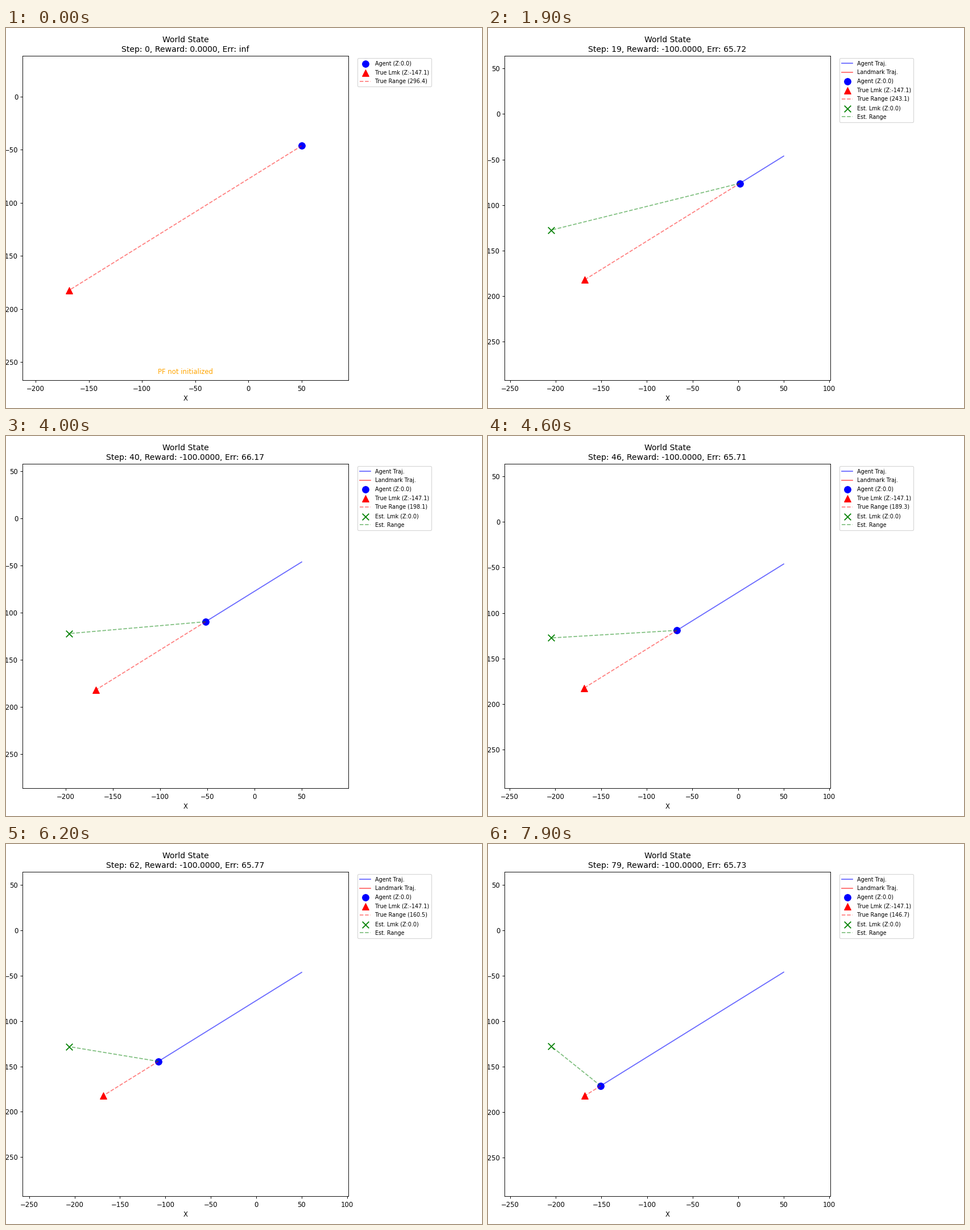
A matplotlib script that plays this animation: 837 by 669 pixels, repeating every 8000 ms.

```python
import numpy as np
import matplotlib.pyplot as plt
from matplotlib.animation import FuncAnimation
from matplotlib.ticker import MultipleLocator

W, H, DPI = 837, 669, 83.7
LEFT, TOP, RIGHT, BOTTOM = 29.4, 48.6, 601.7, 620.4  # plot box in pixels
STEPS, INTERVAL = 80, 100

# World geometry: the agent heads straight for the landmark
START = np.array([50.0, -46.2])
LANDMARK = np.array([-168.4, -182.2])
DEPTH = 147.1
AHEAD = (START - LANDMARK) / np.linalg.norm(START - LANDMARK)
SIDE = np.array([-AHEAD[1], AHEAD[0]])
OFFSET = 65.69  # sideways error of the estimate

# Key steps: agent x, measured range, estimate shift along the heading
KEYS = [0, 19, 31, 40, 51, 62, 79]
AGENT_X = [50, 1.9, -28.9, -51.9, -79.5, -107.7, -150.8]
RANGES = [296.4, 243.1, 217.4, 198.1, 182.7, 160.5, 146.7]
SHIFTS = [6, -1.985, 25.066, 7.955, -9.546, -3.24, -2.29]


def agent_at(step):
    x = np.interp(step, KEYS, AGENT_X)
    return START + AHEAD * (x - START[0]) / AHEAD[0]


def distance(step):
    return np.hypot(np.linalg.norm(agent_at(step) - LANDMARK), DEPTH)


BIAS = [r - distance(k) for k, r in zip(KEYS, RANGES)]


def segment(a, b, style, alpha, label):
    ax.plot([a[0], b[0]], [a[1], b[1]], style, alpha=alpha, label=label)


def fit_view(points):
    low, high = np.min(points, axis=0), np.max(points, axis=0)
    mid, half = (low + high) / 2, 0.7 * np.max(high - low)
    ax.set_xlim(mid[0] - half, mid[0] + half)
    ax.set_ylim(mid[1] - half, mid[1] + half)


def draw(step):
    ax.clear()
    agent = agent_at(step)
    measured = distance(step) + np.interp(step, KEYS, BIAS)
    points = [START, agent, LANDMARK]
    reward, err = "0.0000", "inf"

    if step > 0:
        segment(START, agent, "b-", 0.6, "Agent Traj.")
        segment(LANDMARK, LANDMARK, "r-", 0.6, "Landmark Traj.")
    ax.scatter(*agent, c="blue", marker="o", s=100, label="Agent (Z:0.0)")
    ax.scatter(*LANDMARK, c="red", marker="^", s=100,
               label=f"True Lmk (Z:-{DEPTH})")
    segment(agent, LANDMARK, "r--", 0.5, f"True Range ({measured:.1f})")

    if step > 0:
        shift = np.interp(step, KEYS, SHIFTS)
        guess = LANDMARK + OFFSET * SIDE + shift * AHEAD
        ax.scatter(*guess, c="green", marker="x", s=100,
                   label="Est. Lmk (Z:0.0)")
        segment(agent, guess, "g--", 0.5, "Est. Range")
        points.append(guess)
        reward, err = "-100.0000", f"{np.hypot(OFFSET, shift):.2f}"
    else:
        ax.text(0.5, 0.02, "PF not initialized", color="orange",
                ha="center", transform=ax.transAxes)

    fit_view(points)
    ax.xaxis.set_major_locator(MultipleLocator(50))
    ax.yaxis.set_major_locator(MultipleLocator(50))
    ax.set_xlabel("X", labelpad=3.5)
    ax.set_title(f"World State\nStep: {step}, Reward: {reward}, Err: {err}",
                 linespacing=1.26)
    ax.legend(loc="upper left", bbox_to_anchor=(1.02, 1), fontsize="small",
              labelspacing=0.59, borderpad=0.42)
    return ax.get_children()


fig = plt.figure(figsize=((W + 0.01) / DPI, (H + 0.01) / DPI), dpi=DPI)
ax = fig.add_axes([LEFT / W, 1 - BOTTOM / H,
                   (RIGHT - LEFT) / W, (BOTTOM - TOP) / H])

anim = FuncAnimation(fig, draw, frames=STEPS, init_func=lambda: [],
                     interval=INTERVAL, repeat=True, repeat_delay=0)
plt.show()
```
